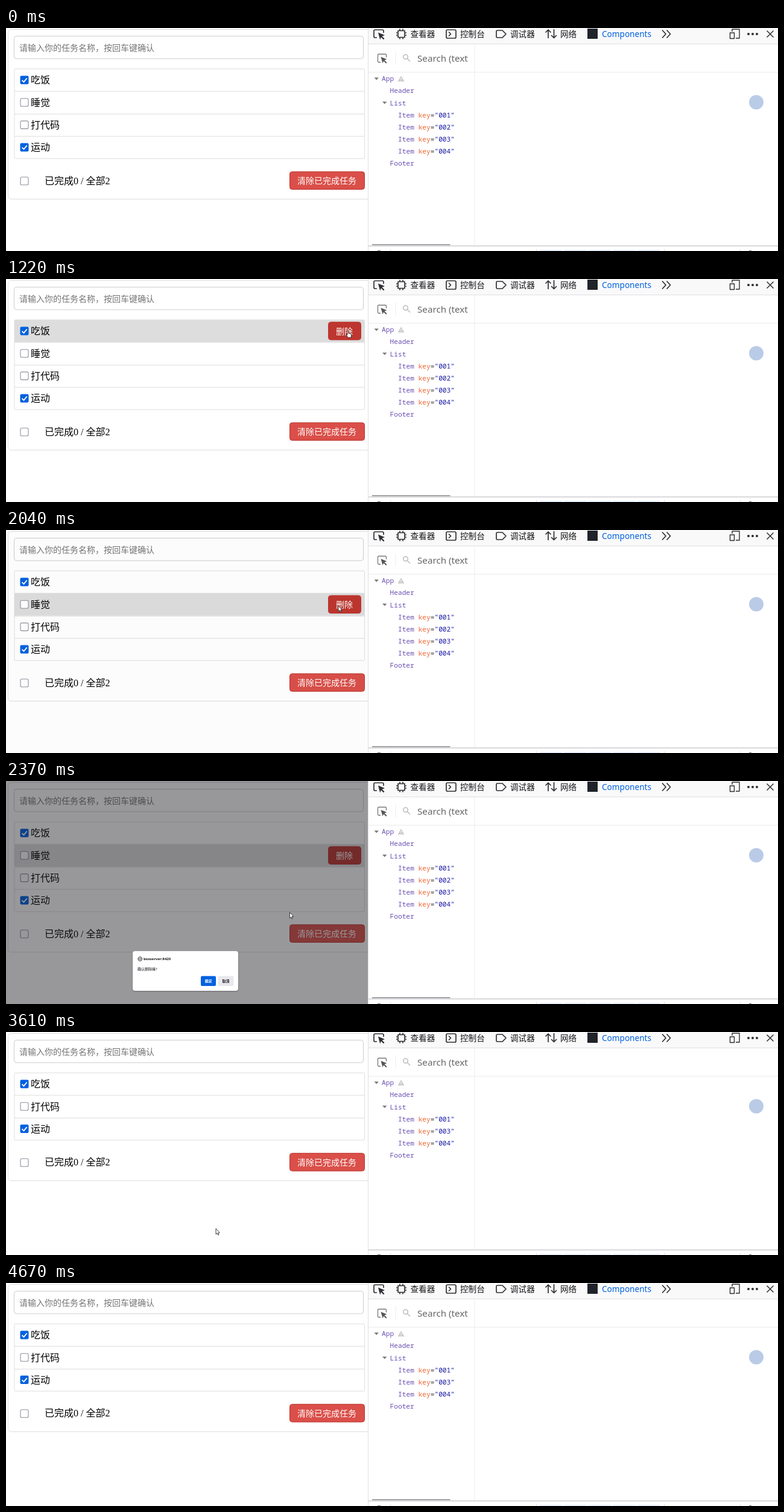
An HTML page that plays this animation: 1280 by 371 pixels, repeating every 5000 ms.

```html
<!DOCTYPE html>
<html lang="zh">
<head>
<meta charset="utf-8">
<style>
  html, body { margin: 0; height: 100%; overflow: hidden; background: #fff; }
  svg { display: block; width: 100vw; height: 100vh; }
  text { white-space: pre; }
  .page { font: 16px "Liberation Serif", "Noto Sans CJK SC", serif; }
  .ui { font: 14px "Noto Sans", "Noto Sans CJK SC", sans-serif; }
  .mono { font: 11.2px "Noto Sans Mono", "DejaVu Sans Mono", monospace; }
  .small { font: 6px "Noto Sans", "Noto Sans CJK SC", sans-serif; }
  .line { fill: none; stroke: #2f2f33; stroke-width: 1.7; stroke-linejoin: round; }
</style>
</head>
<body>
<svg viewBox="0 0 1280 371" preserveAspectRatio="none">
  <g id="page" class="page"></g>

  <g id="modal">
    <rect id="shade" width="601" height="371" fill="#1c1b22"/>
    <g id="dialog" class="small">
      <rect x="209" y="283" width="177" height="68" rx="5" fill="#000" opacity=".15"/>
      <rect x="210" y="283" width="175" height="66" rx="4" fill="#fff"/>
      <g fill="none" stroke="#333" stroke-width=".7">
        <circle cx="222.3" cy="296" r="3.6"/>
        <ellipse cx="222.3" cy="296" rx="1.6" ry="3.6"/>
        <path d="M218.7 296h7.2"/>
      </g>
      <text x="228" y="298.2" font-weight="700" fill="#15141a">boxserver:8420</text>
      <text x="218" y="315.2" font-weight="500" fill="#15141a">确认删除嘛?</text>
      <rect id="ok" x="323" y="324.5" width="25" height="16.5" rx="2"/>
      <text x="329.7" y="335" font-weight="700" fill="#fff">确定</text>
      <rect x="351.5" y="324.5" width="26" height="16.5" rx="2" fill="#e9e9ed"/>
      <text x="358.5" y="335" font-weight="700" fill="#15141a">取消</text>
      <circle id="click" cx="339" cy="331" r="6" fill="#c3c81e" opacity=".75"/>
    </g>
  </g>

  <!-- developer tools -->
  <g class="ui">
    <path d="M601 0h679v371H601z" fill="#fff"/>
    <path d="M601 0h679v26H601z" fill="#f9f9fa"/>
    <path d="M600.5 0V371M601 26.5h679" fill="none" stroke="#e0e0e2"/>
    <path d="M601 73.5h679M777 27V361M646 39V61" fill="none" stroke="#ebebed"/>
    <g class="line">
      <path d="M615 16h-3q-2 0-2-2V5q0-2 2-2h12q2 0 2 2v3"/>
      <path d="M650 4.5h11v11h-11zM653 4V1.5M658 4V1.5M653 16v2.5M658 16v2.5M649 8h-2M664 8h-2M649 12h-2M664 12h-2"/>
      <rect x="730" y="3" width="16" height="14" rx="2"/>
      <path d="M734 6.5l3.5 3.5-3.5 3.5"/>
      <path d="M814.5 4h8.5l6 6-6 6h-8.5q-1.5 0-1.5-1.5v-9q0-1.5 1.5-1.5z"/>
      <path d="M899 17V3M894.5 7.5L899 3l4.500 4.500M908.500 2V16.500M904 12l4.500 4.500 4.500-4.500"/>
      <path d="M1088 3.500l6 6.500-6 6.500M1095.500 3.500l6 6.500-6 6.500"/>
      <path d="M1204 6V2h12v15h-6M1200.500 8h7v9.500h-7z" stroke-width="1.400"/>
      <path d="M1261.500 4.500l11 11M1272.500 4.500l-11 11" stroke-width="1.500"/>
    </g>
    <path d="M617 7.500l11 4.500-4.500 1.700 4 4-1.600 1.600-4-4-1.700 4.300z" fill="#2f2f33"/>
    <g fill="#2f2f33">
      <circle cx="1231" cy="10" r="2"/><circle cx="1238" cy="10" r="2"/><circle cx="1245" cy="10" r="2"/>
    </g>
    <path d="M964 1h17v17h-17z" fill="#20232a"/>
    <g font-size="13.6" fill="#18181b">
      <text x="670.5" y="14.800">查看器</text>
      <text x="753" y="14.800">控制台</text>
      <text x="836" y="14.800">调试器</text>
      <text x="919" y="14.800">网络</text>
      <text x="988" y="14.800" fill="#0061e0">Components</text>
    </g>
    <path d="M621 57h-3q-1.500 0-1.500-1.500V45q0-1.500 1.500-1.500h11q1.500 0 1.500 1.500v4" fill="none" stroke="#777" stroke-width="1.300"/>
    <path d="M621.500 48l10 4-4 1.600 4 4-1.400 1.400-4-4-1.500 3.800z" fill="#555"/>
    <g fill="none" stroke="#bbb" stroke-width="1.500">
      <circle cx="662.500" cy="48" r="3.800"/><path d="M665.500 51l4.500 4.500"/>
    </g>
    <text x="682" y="56" font-size="15.2" fill="#666">Search (text</text>
    <circle cx="1244" cy="123.500" r="12" fill="#b9cbe6"/>
    <g id="tree" class="mono"></g>
    <path d="M601 362.500h679" stroke="#dedee1" stroke-width="2.500"/>
    <path d="M637.500 368v3M879.500 368v3M1091.500 368v3M1217.500 368v3" stroke="#ddd"/>
    <path d="M885 371v-2h37v2zm40.500 0v-2h37v2zm40.500 0v-2h37v2zm40.500 0v-2h37v2zm40.500 0v-2h37v2z" fill="#e6f1fc"/>
    <path d="M616 370.500h5M1232 370.500h4" stroke="#777"/>
    <path id="bar" d="M607 360.500h129.500" stroke="#858588" stroke-width="1.500"/>
  </g>

  <g id="cursor" stroke="#222" stroke-width=".85" fill="#fff" stroke-linejoin="round">
    <path id="arrow" d="M0 0V9.500L2.200 7.600 3.600 10.800 5 10.200 3.700 7H6.300Z"/>
    <path id="hand" d="M-1 6V1a1 1 0 0 1 2 0V4.500l3.500.7q1.300.3 1.100 1.500L5 11.500H.5L-2.800 7.600q.2-1.400 1.800-.4Z"/>
  </g>
</svg>
<script>
const $ = id => document.getElementById(id);
const LOOP = 5000, TICK = 82, PITCH = 37.3, TOP = 68;
const tasks = [['吃饭', 1, '001'], ['睡觉', 0, '002'], ['打代码', 0, '003'], ['运动', 1, '004']];

// pointer path: time, x, y, easing power (below 1 slows down at the end)
const path = [
  [82, 1244, 364, 1], [492, 572, 91, .55], [640, 572, 91, 1], [820, 567, 86, 1],
  [1230, 567, 86, 1], [1722, 556, 122, 1], [2050, 551, 126, 1], [2296, 530, 168, 1],
  [2870, 338.5, 330.500, .6], [3526, 338.5, 330.500, 1], [3608, 348, 327, 1],
  [3936, 757, 153, 1], [4100, 953, 222, 1], [4510, 1256, 365, .8]
];
const clamp = v => Math.max(0, Math.min(1, v));
const between = (t, a, b) => t >= a && t < b;

function pointer(t) {
  const i = path.findIndex(k => k[0] > t);
  if (i < 1) return path[i ? path.length - 1 : 0].slice(1, 3);
  const [a, b] = [path[i - 1], path[i]];
  const p = ((t - a[0]) / (b[0] - a[0])) ** b[3];
  return [a[1] + (b[1] - a[1]) * p, a[2] + (b[2] - a[2]) * p];
}

const rect = (x, y, w, h, fill, more = '') =>
  `<rect x="${x}" y="${y}" width="${w}" height="${h}" fill="${fill}" ${more}/>`;
const text = (x, y, s, more = '') => `<text x="${x}" y="${y}" ${more}>${s}</text>`;

function checkbox(y, on) {
  return on
    ? rect(23.5, y, 14, 14, '#0060df', 'rx="2"') +
      `<path d="M26.500 ${y + 7.3}l3 3 5.200-6.300" fill="none" stroke="#fff" stroke-width="1.800"/>`
    : rect(24, y + .5, 13, 13, '#fff', 'rx="2" stroke="#8f8f9d" stroke-width="1.1"');
}

function button(x, y, w, label, fill) {
  return rect(x + .5, y + .5, w - 1, 29.5, fill, 'rx="4" stroke="#bd362f"') +
    text(x + 13, y + 20.5, label, 'class="ui" style="fill:#fff"');
}

function drawPage(list, hover, inspect) {
  const h = list.length * PITCH, end = TOP + h;
  let s = rect(3.5, 2.5, 640, end + 65, '#fff', 'rx="5" stroke="#ddd"') +
    rect(13.5, 13.5, 579, 37.5, '#fff', 'rx="4" stroke="#ccc"') +
    text(22, 38.3, '请输入你的任务名称，按回车键确认', 'class="ui" fill="#757575"');
  list.forEach(([name, done], i) => {
    const y = TOP + i * PITCH;
    if (i === hover) s += rect(14, y, 580, PITCH, '#ddd');
    s += checkbox(y + 11.5, done) + text(41, y + 24.4, name);
    if (i) s += `<path d="M14 ${Math.round(y) + .2}h580" stroke="#ddd"/>`;
    if (i === hover) s += button(534, y + 3.2, 55, '删除', '#bd362f');
  });
  s += rect(14, TOP, 580.5, h, 'none', 'rx="1.5" stroke="#ddd"') +
    checkbox(end + 30.3, 0) + text(64, end + 42.3, '已完成0 / 全部2') +
    button(470, end + 21.3, 125, '清除已完成任务', '#da4f49');
  if (inspect) {
    s += rect(14, 68, 5.5, 37, 'rgba(77,200,0,.3)') + rect(589, 68, 5.5, 37, 'rgba(77,200,0,.3)') +
      rect(19.5, 68, 569.5, 37, 'rgba(120,170,210,.7)') +
      rect(19, 110, 134, 21, '#333740', 'rx="2"') +
      '<path d="M60 114v13" stroke="#aaa"/><g class="mono" font-weight="700">' +
      text(24, 124.7, 'Item', 'style="font-weight:700" fill="#ee78e6"') +
      text(68, 124.7, '576px × 37px', 'style="font-weight:700;font-size:11px" fill="#d7d7d7"') + '</g>';
  }
  return s;
}

function drawTree(list, inspect) {
  let s = inspect ? rect(601, 135, 175.5, 20, '#e5f2ff') : '', y = 88.3;
  const row = (x, label) => { s += text(x, y, label, 'fill="#6a51b2"'); y += 20.1; };
  row(623, 'App');
  row(636.5, 'Header');
  row(636.5, 'List');
  for (const [, , key] of list)
    row(650, `Item <tspan fill="#ef6632">key</tspan><tspan fill="#333">=</tspan><tspan fill="#1a1aa6">"${key}"</tspan>`);
  row(636.5, 'Footer');
  return s + '<path d="M610.500 82.500h7.500l-3.750 4zM624 122.500h7.500l-3.750 4z" fill="#777"/>' +
    '<path d="M655 79.500l5.500 9.500h-11z" fill="#ccc"/><path d="M655 83v3M655 87v1" stroke="#fff"/>';
}

let last = '';
function frame(now) {
  const t = Math.floor((now % LOOP + 22) / TICK) * TICK;
  const [x, y] = pointer(t);
  const deleted = t >= 3600, seen = between(t, 80, 4600);
  let hover = -1;
  if (between(t, 2040, 3600)) hover = 1;
  else if (seen && !deleted && x < 594) hover = Math.floor((y - TOP) / PITCH);
  const inspect = between(t, 3900, 4010);

  const state = [deleted, hover, inspect].join();
  if (state !== last) {
    const list = tasks.filter((_, i) => !deleted || i !== 1);
    $('page').innerHTML = drawPage(list, hover, inspect);
    $('tree').innerHTML = drawTree(list, inspect);
    last = state;
  }

  const show = (id, on) => $(id).setAttribute('visibility', on ? 'visible' : 'hidden');
  const pressed = between(t, 3190, 3600), hand = hover >= 0 && t < 2040;
  $('modal').style.display = between(t, 2040, 3600) ? '' : 'none';
  $('shade').setAttribute('opacity', .45 * clamp((t - 2046) / 160));
  $('dialog').setAttribute('opacity', clamp((t - 2060) / 160));
  $('ok').setAttribute('fill', pressed ? '#053e94' : between(t, 2700, 3190) ? '#0250bb' : '#0061e0');
  show('click', pressed);
  $('bar').setAttribute('opacity', t < 3800 ? clamp((2950 - t) / 250) : 1);
  show('arrow', seen && !hand);
  show('hand', seen && hand);
  $('cursor').setAttribute('transform', `translate(${x} ${y})`);
  requestAnimationFrame(frame);
}
requestAnimationFrame(frame);
</script>
</body>
</html>
```
